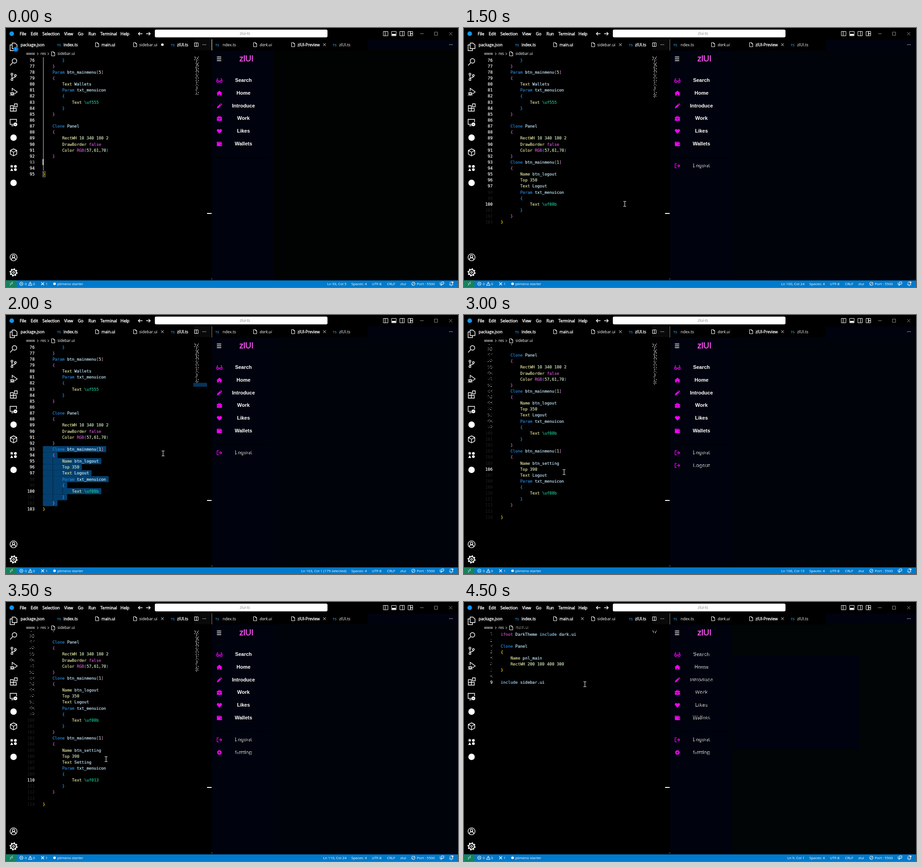
Recreate the animation shown at these times as an HTML page. Size 987 by 567 pixels, loop 5000 ms.

```html
<!DOCTYPE html>
<html lang="en">
<head>
<meta charset="utf-8">
<title>Editor with live preview</title>
<style>
html, body { margin: 0; width: 100%; height: 100%; overflow: hidden; background: #000; }
svg { display: block; width: 987px; height: 567px; }
text { font-family: "Open Sans", "Noto Sans", sans-serif; font-size: 8.6px; fill: #fff; white-space: pre; }
.menu text { font-size: 9px; stroke: #fff; stroke-width: .45px; }
.crumb { font-size: 8.2px; }
.status text { font-size: 7.85px; }
.code text, .num { font-family: "DejaVu Sans Mono", "Noto Sans Mono", monospace; font-size: 8.83px; }
.code tspan, .num { fill: var(--ink); stroke: var(--ink); stroke-width: .22px; }
.num { text-anchor: end; }
.nav { font: bold 11px "Liberation Sans", Arial, sans-serif; text-anchor: middle; }
.bold { stroke: #fff; stroke-width: .35px; }
.line { fill: none; stroke: #fff; stroke-width: 1.4; }
.thin { fill: none; stroke: #fff; stroke-width: 1; }
.solid { fill: #fff; }
.dark { fill: none; stroke: #000; }
.pink { fill: #f0f; stroke: none; }
.pinkline { fill: none; stroke: #f0f; stroke-width: 1.3; }
</style>
</head>
<body>
<svg viewBox="0 0 987 567" xmlns="http://www.w3.org/2000/svg">
  <defs>
    <pattern id="bits" width="5" height="3" patternUnits="userSpaceOnUse">
      <path d="M0 0h5v1h-5zM1 1h2v1h-2zM4 2h1v1h-1z" fill="#fff"/>
    </pattern>
    <pattern id="specks" width="7" height="5" patternUnits="userSpaceOnUse">
      <path d="M0 1h5v1h-5zM2 2h2v1h-2zM5 4h2v1h-2z" fill="#fff"/>
    </pattern>
    <pattern id="greenBits" width="5" height="3" patternUnits="userSpaceOnUse">
      <path d="M0 0h5v1h-5zM1 1h2v1h-2zM4 2h1v1h-1z" fill="#3a8a10"/>
    </pattern>
    <clipPath id="pane"><rect x="40" y="63" width="370" height="489"/></clipPath>
  </defs>
  <g id="scene"></g>
  <g id="chrome"></g>
</svg>
<script>
const STEP = 500, LOOP = 5000, ROW = 13.13, CHAR = 5.32, LEFT = 80.2;

const text = (x, y, s, attrs = '') => `<text x="${x}" y="${y}" ${attrs}>${s}</text>`;
const rect = (x, y, w, h, fill, attrs = '') =>
  `<rect x="${x}" y="${y}" width="${w}" height="${h}" fill="${fill}" ${attrs}/>`;
const path = (d, cls = 'line') => `<path d="${d}" class="${cls}"/>`;
const circle = (x, y, r, attrs = 'class="line"') => `<circle cx="${x}" cy="${y}" r="${r}" ${attrs}/>`;
const disc = (x, y, r) => circle(x, y, r, 'class="solid"');
const at = (x, y, s) => `<g transform="translate(${x} ${y})">${s}</g>`;
const cross = (x, y, r = 2.8, cls = 'thin') =>
  path(`M${x - r} ${y - r}l${2 * r} ${2 * r}m0 ${-2 * r}l${-2 * r} ${2 * r}`, cls);
const page = (x, y) => at(x, y, path('M-3.5-4.5h4.5l2.5 2.5v6.5h-7zM1-4.5v2.5h2.5', 'thin'));
const ts = x => text(x, 39.5, 'TS', 'style="fill:#2b96dd;font-size:7.6px;font-weight:600"');
const dots = (x, y) => [-3, 0, 3].map(d => disc(x + d, y, .8)).join('');
const gear = (r, color, ring = .36) =>
  circle(0, 0, r, `fill="none" stroke="${color}" stroke-width="${r * ring}"`) +
  circle(0, 0, r * 1.25, `fill="none" stroke="${color}" stroke-width="${r * (ring + .1)}" stroke-dasharray="${r * .4909}"`);

// Chrome that never changes
const activity = [
  [41, path('M-3-8h6l4.5 4v8h-10.5zM-3-4h-4.5v12.5h9.5v-4')],
  [74, circle(2, -2, 5) + path('M-2 2l-5.5 6')],
  [107, circle(-3.5, -6, 2) + circle(4, -3, 2) + circle(-3.5, 6, 2) + path('M-3.5-4V4M4-1c0 4-7 2-7.5 5')],
  [140, path('M-3-2V-8L8 0L1 5') + circle(-3, 4, 3) + path('M-8 1l10 7M2 1l-10 7', 'thin')],
  [174, path('M-7-4h6.5v12h-6.5zM-7 2h13v6h-13zM2-8h6v6.5h-6z')],
  [207, path('M0 4h-7.5v-11h14v6M-5 7h5') + disc(4, 4, 4) + path('M2.5 4h3', 'dark')],
  [240, disc(0, 0, 7)],
  [272, path('M0-7.5l7 3.5v8l-7 4-7-4v-8zM-7-4l7 4 7-4M0 0v8')],
  [306, path('M-4-7l1.2 2.3 2.5.3-1.8 1.8.5 2.6-2.4-1.3-2.4 1.3.5-2.6-1.8-1.8 2.5-.3zM-4 1l3.3 6h-6.6z', 'solid') +
    disc(4, -3, 3) + disc(4, 4, 3)],
  [339, disc(0, 0, 7)],
  [502, circle(0, 0, 7.6) + circle(0, -2, 2.8) + path('M-5 5.5c1-6 9-6 10 0')],
  [535, gear(6, '#fff') + circle(0, 0, 2)]
];

const menus = [[30, 'File'], [54, 'Edit'], [79.5, 'Selection'], [127, 'View'], [157, 'Go'],
  [180, 'Run'], [206, 'Terminal'], [250, 'Help']];
const statusLabels = [[41, '0'], [59, '0'], [86.5, '1'], [112, 'plimeno starter'], [754, 'Spaces: 4'],
  [799, 'UTF-8'], [832, 'CRLF'], [861, 'zlui'], [897, 'Port : 5500']];

function titleBar() {
  let s = circle(12.5, 12.5, 5, 'fill="#1593e6"');
  s += `<g class="menu">${menus.map(([x, m]) => text(x, 15.7, m)).join('')}</g>`;
  s += path('M298 12.5h-9m3.5-3.5l-3.5 3.5 3.5 3.5M306 12.5h9m-3.5-3.5l3.5 3.5-3.5 3.5');
  s += rect(325, 3.5, 377, 17, '#fff', 'rx="3"');
  s += text(510.5, 15, 'zlui-ts', 'style="fill:#888;font-size:8.2px"');
  const inner = [path('M828 7v10', 'thin'), rect(843, 13, 8, 3.5, '#fff'), path('M866 7v10', 'thin'),
    path('M883 7v10M883 12.5h5')];
  [829, 847, 865, 883].forEach((x, i) => s += path(`M${x - 5} 7.5h10v9.5h-10z`, 'thin') + inner[i]);
  return s + `<g opacity=".55">${path('M904 12.5h8M935.5 9h7v7h-7z', 'thin')}${cross(971, 12.5, 3.5)}</g>`;
}

function tabBar() {
  let s = rect(411, 25, 37, 23.5, '#080908');
  s += text(32, 39.7, 'package.json', 'class="bold"');
  s += ts(111.5) + text(125.5, 39.7, 'index.ts', 'class="bold"');
  s += page(199, 36.5) + text(208.5, 39.7, 'main.ui', 'class="bold"');
  s += page(282, 36.5) + text(291, 39.7, 'sidebar.ui');
  s += ts(360) + text(373.5, 39.7, 'zlUI.ts', 'class="bold"');
  s += path('M411.5 32.5h8v8h-8zM415.5 32.5v8', 'thin') + dots(433, 36.5);
  s += ts(457) + text(473, 39.7, 'ndex.ts');
  s += page(544, 36.5) + text(554, 39.7, 'dark.ui', 'font-style="italic"');
  s += page(627, 36.5) + text(636.5, 39.7, 'zlUI-Preview', 'class="bold"') + cross(695.5, 36.5);
  s += ts(713.5) + text(727.5, 39.7, 'zlUI.ts') + dots(971.5, 36.5);
  s += text(44, 59.3, 'www', 'class="crumb"') + text(75.5, 59.3, 'res', 'class="crumb"');
  return s + path('M68 54l2.5 2.5-2.5 2.5M91 54l2.5 2.5-2.5 2.5', 'thin') + page(103, 56.5);
}

function statusBar() {
  let s = rect(0, 552.5, 987, 14.5, '#007acc') + rect(0, 552.5, 23, 14.5, '#16825d');
  s += path('M8.5 558.5l3 2.5-3 2.5M15 555.5l-3 2.5 3 2.5', 'thin');
  s += `<g class="status">${statusLabels.map(([x, l]) => text(x, 562.8, l)).join('')}</g>`;
  s += circle(33.5, 560, 3.7, 'class="thin"') + cross(33.5, 560, 1.5);
  s += path('M53 556l4 7.5h-8zM53 558.5v3', 'thin') + cross(80, 560, 3, 'line');
  s += disc(106, 560, 2.8) + circle(889.5, 560, 3.7, 'class="thin"') + path('M887 562.5l5-5', 'thin');
  s += path('M948 557v5h2v2l2-2h1M951 556h5v4.5h-3l-2 1.5z', 'thin');
  return s + path('M968.5 562.5h7.5l-1-1.5v-2.5c0-4-5.5-4-5.5 0v2.5zM971 564.5h2', 'thin') + disc(975, 557, 2);
}

const fixed = titleBar() + tabBar() + activity.map(([y, icon]) => at(16.5, y, icon)).join('') +
  rect(439, 405, 10, 2, '#fff') + rect(449, 548.5, 1, 2, '#bbb') + statusBar();

// Documents
const block = (name, top, label, icon) => ['    Clone btn_mainmenu[1]', '    {', `        Name ${name}`,
  `        Top ${top}`, `        Text ${label}`, '        Param txt_menuicon', '        {',
  `            Text \\${icon}`, '        }', '    }'];
const head = ['        }', '    }', '    Param btn_mainmenu[5]', '    {', '        Text Wallets', '        Param txt_menuicon',
  '        {', '            Text \\uf555', '        }', '    }', '', '    Clone Panel', '    {',
  '        RectWH 10 340 180 2', '        DrawBorder false', '        Color RGB(57,61,70)', '    }'];
const logout = block('btn_logout', 350, 'Logout', 'uf08b');
const sidebar = (...parts) => [...head, ...parts.flat(), '}'];
const mainFile = include => ['ifnot DarkTheme include dark.ui', '', 'Clone Panel', '{', '    Name pnl_main',
  '    RectWH 200 100 400 300', '}', '', include];

const rules = [
  [/^#.*/, 'url(#greenBits)'],
  [/^(Clone|Param)\b/, '#2586d8'],
  [/^(Name|Top|Text|RectWH|DrawBorder|Color)\b/, '#dcdc9c'],
  [/^\\u\w+/, '#17c794'],
  [/^(false|RGB|ifnot)\b/, '#d050d0'],
  [/^include\b/, '#8fd0f5'],
  [/^[\[\]]/, '#c586c0'],
  [/^[()]/, '#3aa0ff'],
  [/^\d+/, '#cfe6bc'],
  [/^[\w.]+/, '#c4e6f8'],
  [/^./, '#ddd']
];
const braceColors = ['#ffd700', '#da60d6', '#179fff'];
const span = (s, color) => `<tspan style="--ink:${color}">${s}</tspan>`;

function codeLine(line, y) {
  const indent = line.search(/\S/);
  if (indent < 0) return '';
  let rest = line.slice(indent), spans = '';
  if (/^[{}]$/.test(rest)) spans = span(rest, braceColors[indent / 4]);
  else while (rest) {
    const [re, color] = rules.find(([r]) => r.test(rest));
    const word = rest.match(re)[0];
    spans += span(word, color);
    rest = rest.slice(word.length);
  }
  return text(LEFT + indent * CHAR, y + 3.2, spans);
}

// Preview icons, centred on 0,0
const icons = {
  Search: path('M-6 1l1.5-5h1.5M6 1l-1.5-5h-1.5M-1.5 1.5h3', 'pinkline') +
    circle(-3.6, 2, 2.2, 'class="pinkline"') + circle(3.6, 2, 2.2, 'class="pinkline"'),
  Home: path('M0-5.5l6.5 5.5h-1.7v5h-3.3v-3h-3v3h-3.3v-5h-1.7z', 'pink'),
  Introduce: path('M-5.5 5.5l.8-3.5 5.7-5.7 2.7 2.7-5.7 5.7zM2-4.5l1.3-1.2 2.7 2.7-1.3 1.3z', 'pink'),
  Work: path('M-5.5-3h11v3.3h-11zM-5.5 1h4v1h3v-1h4v4h-11z', 'pink') + path('M-2-3v-1.8h4v1.8', 'pinkline'),
  Likes: path('M0 5.5l-4.8-5c-2.5-3.5 2-7.5 4.8-3.5 2.8-4 7.3 0 4.8 3.5z', 'pink'),
  Wallets: path('M-5.5-4.5h10v1.5h-8.5v.7h9.5v7.3h-11z', 'pink') + circle(3.3, 1.5, .9, 'fill="#001"'),
  Logout: path('M-1.5-4.5h-3.5v9h3.5M-2 0h6.5M2-3l3 3-3 3', 'pinkline'),
  Setting: gear(3.1, '#f0f', .8)
};
const navItems = ['Search', 'Home', 'Introduce', 'Work', 'Likes', 'Wallets'];

function navRow(label, icon, y, broken) {
  return at(466, y + .7, icons[icon]) +
    text(518.5, y + 4, label, `class="nav" ${broken ? 'style="fill:url(#bits)"' : ''}`);
}

function preview(f) {
  let s = rect(450, 49, 537, 503.5, f.bg || '#01030b') + rect(789, 25, 198, 23.5, '#00020e');
  if (f.panel) s += rect(588, 118, 274, 205, '#00020f');
  if (!f.extra) return s;
  s += rect(450, 49, 135, 503, '#00020d') + rect(458, 283, 119, 1.5, '#000004');
  s += path('M460.5 63.5h9.5M460.5 67.5h9.5M460.5 71.5h9.5');
  s += text(509.5, 72.5, 'zlUI', 'style="font:18px \'Liberation Sans\',Arial,sans-serif;fill:#f953f5;stroke:#f953f5;stroke-width:.5px"');
  navItems.forEach((n, i) => s += navRow(n, n, 114.3 + i * 27.7, f.panel));
  f.extra.forEach(([label, icon], i) => s += navRow(label, icon, 301 + i * 27.7, true));
  return s;
}

function minimap(rows) {
  let s = '', seed = 7;
  const rnd = () => (seed = seed * 16807 % 2147483647) / 2147483647;
  for (let i = 0; i < rows; i++) {
    const start = i < 4 ? 411 : 413.5, gap = i < 18 ? 2.5 : 3.5;
    for (let x = start + rnd() * 3; x < 420; x += gap + rnd() * 3)
      s += rect(Math.round(x), 63 + i * 2, 1 + Math.round(rnd() * 1.3), 1, '#fff');
  }
  return s;
}

const early = n => n <= 97;
const edit = { first: 76, tab: 'sidebar', map: 45, full: early };
const frames = [
  { ...edit, code: sidebar('', ''), pos: [93, 5], dirty: 1, bg: '#010202', extra: [], full: () => 1, map: 42, caret: 1 },
  { ...edit, code: sidebar(block('btn_logout', 350, 'Wallets', 'uf555')), pos: [96, 16], dirty: 1, extra: [], beam: [351, 385] },
  { ...edit, code: sidebar(block('btn_logout', 350, 'Logout', 'uf555')), pos: [97, 20], extra: [['Logout', 'Wallets']], beam: [351, 385] },
  { ...edit, code: sidebar(logout), pos: [100, 24], extra: [['Logout', 'Logout']], beam: [351, 385] },
  { ...edit, code: sidebar(logout), pos: [103, 1], note: ' (179 selected)', select: [93, 102],
    extra: [['Logout', 'Logout']], beam: [343, 303], full: n => early(n) || n === 100 },
  { ...edit, first: 77.75, code: sidebar(logout, logout, ''), pos: [105, 24], dirty: 1, ghost: 1,
    extra: [['Logout', 'Logout']], beam: [257.5, 394], full: null },
  { ...edit, first: 85.67, code: sidebar(logout, block('btn_setting', 390, 'Logout', 'uf08b'), ''), pos: [106, 15],
    extra: [['Logout', 'Logout'], ['Logout', 'Logout']], beam: [218.5, 344], full: null },
  { ...edit, first: 85.67, code: sidebar(logout, block('btn_setting', 390, 'Setting', 'uf013'), ''), pos: [110, 24],
    extra: [['Logout', 'Logout'], ['Setting', 'Setting']], beam: [218.5, 344], full: null },
  { first: 1, tab: 'main', code: mainFile('#include sidebar.ui'), pos: [9, 2], map: 3, bg: '#020505', panel: 1, beam: [264.5, 261.5] },
  { first: 1, tab: 'main', code: mainFile('include sidebar.ui'), pos: [9, 1], map: 3, bg: '#020505', panel: 1,
    extra: [['Logout', 'Logout'], ['Setting', 'Setting']], beam: [264, 180] }
];

function numberInk(f, n) {
  if (n === f.pos[0]) return f.caret ? '#aaa' : '#fff';
  if (f.full) return f.full(n) ? '#fff' : '#1c1c1c';
  return n >= 100 ? '#1c1c1c' : 'url(#specks)';
}

function editor(f) {
  const isSide = f.tab === 'sidebar', start = isSide ? 76 : 1;
  let code = '', under = '', nums = '';
  f.code.forEach((line, i) => {
    const n = start + i, y = 70.5 + (n - f.first) * ROW;
    if (y < 60) return;
    if (f.select && n >= f.select[0] && n <= f.select[1]) {
      under += rect(80.5, y - 6.6, (line.length + 1) * CHAR, ROW + .1, '#04406f', 'rx="1.5"');
      const depth = line.search(/\S/) / 4;
      for (let d = 1; d < depth; d++) under += rect(80.5 + d * 4 * CHAR, y - 6.6, 1, ROW, '#02213b');
    }
    code += codeLine(line, y);
    nums += text(62.5, y + 3.2, n, `class="num" style="--ink:${numberInk(f, n)}"`);
  });
  if (f.ghost) {
    under += rect(150, 290.5, 52, 9.5, '#0a4f8c');
    code += text(154, 297, span('_mainmenu', '#a8d8f8'));
  }
  let s = `<g clip-path="url(#pane)">${under}${nums}<g class="code">${code}</g></g>`;
  if (f.caret) s += rect(81, 64, 1, 248, '#d0d0d0') + rect(80, 287, 2, 13, '#fff') +
    rect(80.5, 314, 5, 12, 'none', 'stroke="#998"');
  s += minimap(f.map);
  if (f.select) s += rect(409, 148.5, 30, 8.5, '#06345a');
  s += text(112.5, 59.3, f.tab + '.ui', `class="crumb" ${isSide ? '' : 'style="fill:url(#bits)"'}`);
  return s + (f.dirty ? disc(341.5, 36.5, 2.8) : cross(isSide ? 341.5 : 258.5, 36.5));
}

function overlay(f) {
  let s = rect(449, 25, 1, 24, f.caret ? '#fff' : '#888');
  if (f.dirty) s += circle(21.5, 46.5, 5.5, 'fill="#0078d4"') + text(19.6, 49.2, '1', 'style="font-size:7px"');
  if (f.beam) s += at(...f.beam, path('M-3-5.5h2.5l.5.5.5-.5h2.5M0-5v10M-3 5.5h2.5l.5-.5.5.5h2.5', 'thin'));
  const place = `Ln ${f.pos[0]}, Col ${f.pos[1]}${f.note || ''}`;
  return s + `<g class="status">${text(743.5, 562.8, place, 'text-anchor="end"')}</g>`;
}

const scene = document.getElementById('scene'), chromeLayer = document.getElementById('chrome');
let shown = -1;
function tick() {
  const i = Math.floor(performance.now() % LOOP / STEP);
  if (i !== shown) {
    shown = i;
    const f = frames[i];
    scene.innerHTML = preview(f);
    chromeLayer.innerHTML = fixed + editor(f) + overlay(f);
  }
  requestAnimationFrame(tick);
}
tick();
</script>
</body>
</html>
```
